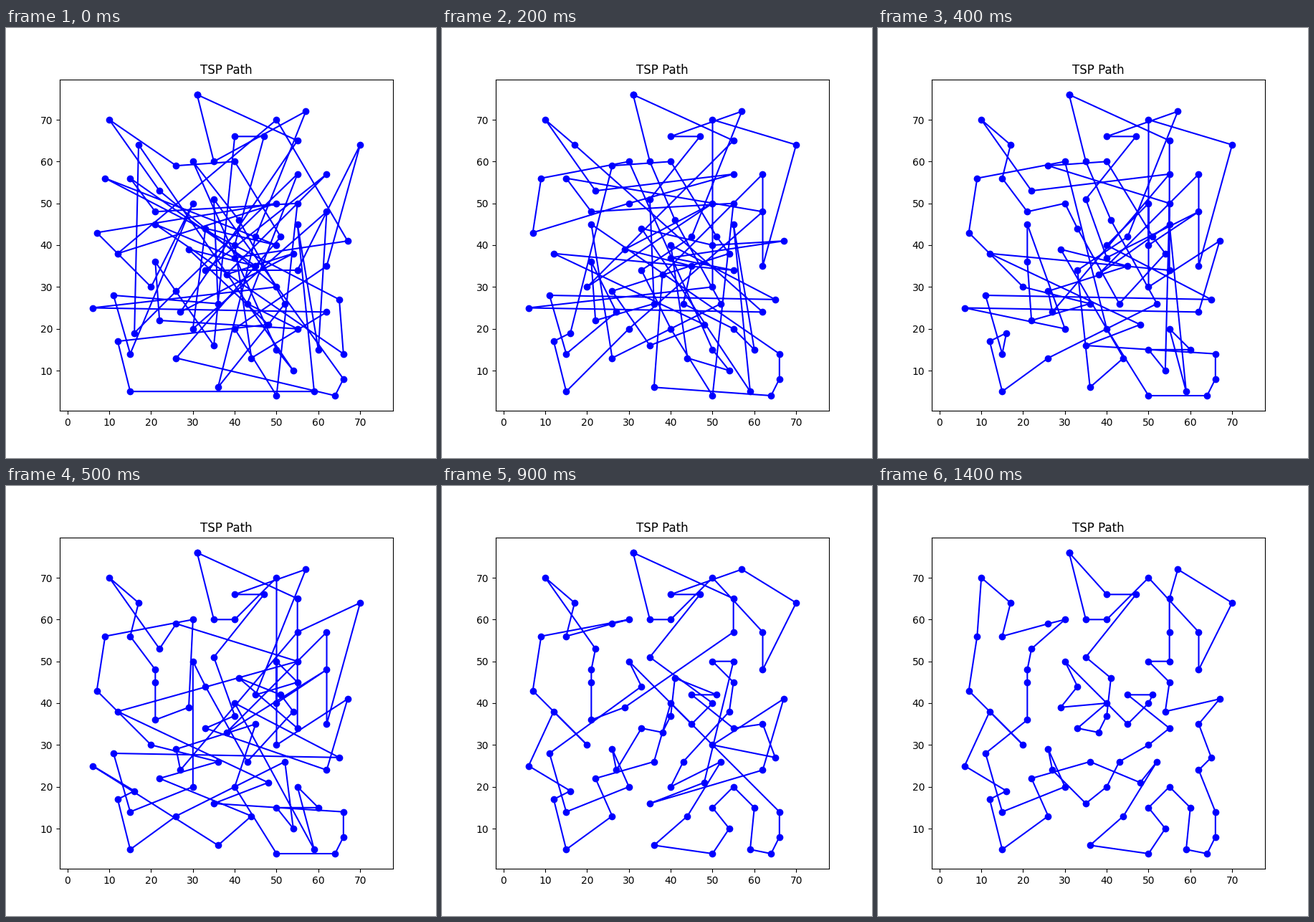
Recreate the animation shown at these times as a matplotlib script. Size 600 by 600 pixels, loop 1500 ms.

```python
import matplotlib.pyplot as plt
import numpy as np
from matplotlib.animation import FuncAnimation

FRAMES, STEP_MS = 15, 100
START_LENGTH = 2300   # length of the first, almost random tour
MAX_DETOUR = 30       # most that one reversal may add to a tour

# The cities, in the order of the best tour
X = [31, 40, 47, 35, 41, 40, 38, 33, 40, 29, 33, 30, 45, 50, 51, 45, 55, 50, 43,
     40, 35, 27, 26, 30, 15, 11, 21, 21, 21, 22, 30, 26, 15, 17, 10, 9, 7, 20,
     12, 6, 16, 12, 15, 26, 22, 36, 48, 52, 44, 36, 50, 54, 50, 55, 60, 59, 64,
     66, 66, 62, 65, 62, 67, 54, 55, 50, 55, 55, 55, 57, 70, 62, 62, 50, 40, 35]
Y = [76, 66, 66, 51, 46, 37, 33, 34, 40, 39, 44, 50, 35, 40, 42, 42, 34, 30, 26,
     20, 16, 24, 29, 20, 14, 28, 36, 45, 48, 53, 60, 59, 56, 64, 70, 56, 43, 30,
     38, 25, 19, 17, 5, 13, 22, 26, 21, 26, 13, 6, 4, 10, 15, 20, 15, 5, 4,
     8, 14, 24, 27, 35, 41, 38, 45, 50, 50, 57, 65, 72, 64, 48, 57, 70, 60, 60]
best = np.column_stack([X, Y])


def close(tour):
    return np.vstack([tour, tour[:1]])


def length(tour):
    return np.hypot(*np.diff(close(tour), axis=0).T).sum()


def worsen(tour, goal, rng):
    """Reverse random stretches, each a small detour, up to the goal length."""
    now = length(tour)
    while now < goal:
        i, j = sorted(rng.choice(np.arange(1, len(tour) + 1), 2, replace=False))
        trial = tour.copy()
        trial[i:j] = tour[i:j][::-1]
        added = length(trial) - now
        if 0 < added < MAX_DETOUR:
            tour, now = trial, now + added
    return tour


def search_history():
    """Walk back from the best tour, so that the search ends on it."""
    rng = np.random.default_rng(7)
    shortest = length(best)
    tours = [best]
    for step in range(FRAMES - 2, -1, -1):
        left = 1 - step / (FRAMES - 1)
        goal = shortest + (START_LENGTH - shortest) * left ** 2
        tours.append(worsen(tours[-1], goal, rng))
    return tours[::-1]


tours = search_history()

fig, ax = plt.subplots(figsize=(6, 6), dpi=100)
path, = ax.plot(*close(tours[0]).T, "bo-")
ax.axis("equal")
ax.set_title("TSP Path")


def draw(step):
    path.set_data(*close(tours[step]).T)
    return path,


anim = FuncAnimation(fig, draw, frames=FRAMES, interval=STEP_MS,
                     repeat=True, repeat_delay=0)
plt.show()
```
